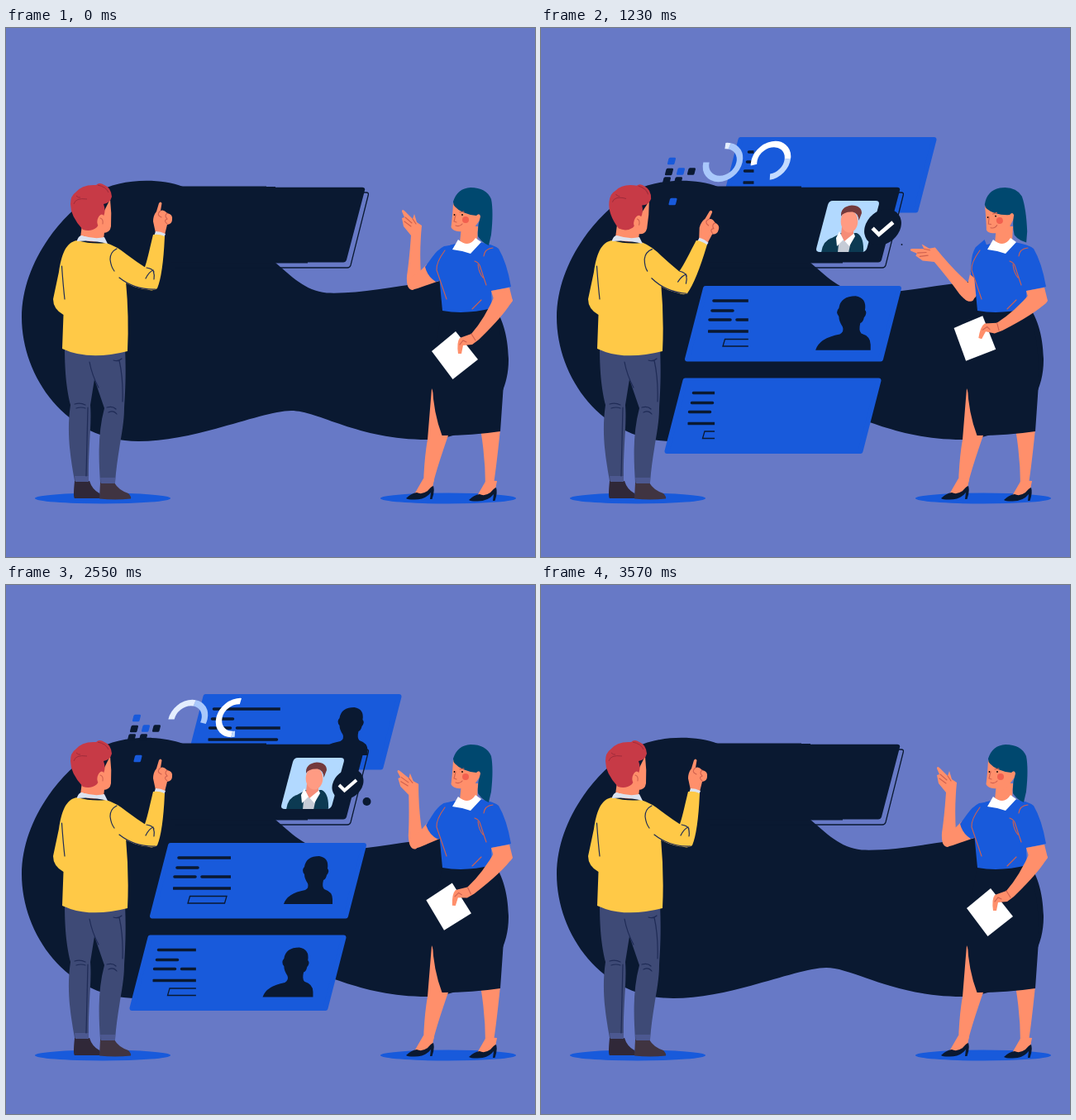
An HTML page that plays this animation: 640 px wide and 640 px high, repeating every 3.66 s.

```html
<!DOCTYPE html>
<html lang="en">
<head>
<meta charset="utf-8">
<title>Profile cards</title>
<style>
  html, body { margin: 0; width: 100%; height: 100%; overflow: hidden; background: #6779c6; }
  svg { display: block; width: 100vw; height: 100vh; }
  .ink { fill: #0a1931; }
  .blue { fill: #185adb; }
  .skin { fill: #ff8f6b; }
  .sun { fill: #ffc947; }
  .jeans { fill: #3e4a76; }
  .teal { fill: #00486f; }
  .red { fill: #c73a46; }
  .white { fill: #fff; }
  .line { fill: none; stroke: #1f2b56; stroke-width: 1.2; stroke-linecap: round; }
  .seam { fill: none; stroke: #cf614f; stroke-width: 1.1; stroke-linecap: round; }
  .card { fill: #185adb; stroke: #185adb; stroke-width: 6; stroke-linejoin: round; }
  .rows { fill: none; stroke: #0a1931; stroke-width: 3.6; stroke-linecap: round; }
  .boxes { fill: none; stroke: #0a1931; stroke-width: 1.3; }
  .tile { stroke-width: 3; stroke-linejoin: round; }
  .arc { fill: none; stroke-width: 7.3; }
</style>
</head>
<body>
<svg viewBox="0 0 640 640">
  <defs>
    <clipPath id="frame"><path d="M355 209H405Q410 209 408.700 214L394.500 266Q393 271 388 271H337Q332 271 333.300 266L347 214Q348.500 209 353 209Z"/></clipPath>
    <g id="foot">
      <path class="skin" d="M505 545L518 546L516 556L507 564L494 564Z"/>
      <path class="ink" d="M484 569Q490 563 497 562Q503 565 510 560Q515 554 517 554Q519 560 515.500 570H513L514 562Q507 571 493 570.500Q486 570.500 484 569Z"/>
    </g>
  </defs>

  <path class="ink" d="M214 192C185 181 136 182 108 200C60 230 19 290 19 350C19 422 73 500 160 500C230 500 310 463 345 463C378 463 425 498 510 498C560 498 609 460 608 400C607 340 575 303 525 306C470 312 430 322 388 320.500C362 318 345 300 326 284V192Z"/>
  <ellipse class="blue" cx="117" cy="569" rx="82" ry="6.500"/>
  <ellipse class="blue" cx="535" cy="569" rx="82" ry="6.500"/>

  <g id="cards"></g>
  <path class="ink" d="M200 191.500H315V192.800H431Q435 193 434 196.500L412 280.500Q411 283.500 408 283.500H365V284.500H248V283.500H200Z"/>
  <path fill="none" stroke="#0a1931" stroke-width="1.300" d="M433 199H436Q439 199 438.300 202L417 287Q416 290 413 290H205"/>

  <g id="photo">
    <g clip-path="url(#frame)">
      <path fill="#b2d9ff" d="M330 205H412V275H330Z"/>
      <path fill="#0c3a52" d="M339 272Q341 257 352 254L363 248H382Q391 252 390 272Z"/>
      <path fill="#c6ccd6" d="M359 272L361 250L377 249L372 272Z"/>
      <path class="white" d="M361 246L366 256L358 264L357 254ZM378 247L366 256L373 264L380 252Z"/>
      <path fill="#f58d78" d="M364 240H378V249L367 258L363 250Z"/>
      <ellipse fill="#ff9b83" cx="373" cy="234" rx="10.300" ry="13.500"/>
      <path fill="#743a3c" d="M363 228Q362 216 376 214.500Q388 215 388 224L384.500 233Q384 224 377 222.500Q366 222 363 228Z"/>
    </g>
  </g>
  <g id="badge">
    <circle class="ink" r="18.500" transform="translate(413.500 241) skewX(-13)"/>
    <path fill="none" stroke="#fff" stroke-width="4" d="M403 242L409.500 248.500L424 236"/>
  </g>
  <circle id="dot" class="ink" r="5" cx="436.500" cy="262"/>
  <g id="tiles"></g>
  <g id="rings"></g>

  <!-- man -->
  <path fill="#302838" d="M83 548H101Q104 558 113 563Q115 567 113 569H83Q81 568 83 548Z"/>
  <path fill="#403441" d="M114 550H131Q136 559 148 563Q152 567 151 569.500Q132 571.500 113 569.500Z"/>
  <path class="jeans" d="M71 386C71 420 74 440 78 456C73 490 78 520 83 548H100C99 510 104 480 102 456L107 425L119 460C111 490 112 520 114 550H132C135 510 143 485 143 460C145 430 145 410 144 386Z"/>
  <path fill="#4c5890" d="M83 542H100V549H84ZM114 544H132V551H115Z"/>
  <path class="line" d="M101 404Q104 420 112 435M137 402Q142 425 141 452M130 402Q136 404 140 400M83 455Q90 453 96 456M85 460Q91 458 96 460M122 459Q129 457 133 461M124 465Q130 462 134 467M99 459Q98 500 97 542"/>
  <path class="skin" d="M92 238H120L118 256Q104 262 90 254Z"/>
  <path class="sun" d="M86 257C72 259 67 275 64 295L57 328Q57 340 69.500 347L68 388Q100 403 147 391Q149 350 145 306L136 275Q130 264 121 260Q104 262 86 257Z"/>
  <path class="line" d="M67.500 288Q69 310 71 328"/>
  <g id="manArm">
    <g id="manFore">
      <path class="skin" d="M181 248L178 234Q178 227 182 222L185 212Q187 209 188.500 212L187 221Q191 219 195 224Q202 225 201 232Q201 237 195 238L192 250Z"/>
      <path class="seam" d="M187 221Q181 226 188 229M195 224Q191 227 195 231Q190 233 195 237"/>
      <path fill="#dce3f0" d="M179 252L181 246Q187 246 193 249L191 254Z"/>
      <path class="sun" d="M178 250C174 266 171 282 167 292L164 312Q175 321 183 315Q190 298 192 252Q185 249 178 250Z"/>
    </g>
    <path class="sun" d="M121 260Q134 264 146 274Q158 283 169 290L179 300L182 316Q158 319 137 303L124 290Z"/>
    <path class="line" d="M134 267Q126 271 126 280Q127 289 131 294M137 302Q156 317 181 316M170 290Q177 291 179 295M169 303Q173 295 178 293Q180 299 179 304"/>
  </g>
  <path fill="#dce3f0" d="M86 257Q88 251 92 251Q107 256 119 253L123 261Q105 256 86 258Z"/>
  <g id="manHead">
    <path class="skin" d="M92 235H112L126 207Q128 224 127 240Q126 248 117 248L114 252H94Z"/>
    <path class="red" d="M84 199Q92 189 109 190Q113 186 119 190Q127 193 128 204Q126 212 118 213Q121 221 118 228L110 241Q103 247 93 244Q78 228 78 213Q78 203 84 199Z"/>
    <ellipse class="skin" cx="115" cy="233" rx="4.500" ry="7.500" transform="rotate(12 115 233)"/>
    <path fill="none" stroke="#9f2c3b" d="M82 213Q84 205 98 207M85 203Q88 206 90 205M111 190Q121 192 124 199"/>
    <path class="seam" d="M114 230Q118 231 117 237"/>
  </g>

  <!-- woman -->
  <path class="skin" d="M515 436L536 490Q522 530 517 550L505 552Q506 520 510 498ZM574 485H598Q594 525 590 552L580 554Q580 520 574 485Z"/>
  <use href="#foot"/>
  <use href="#foot" x="76" y="2"/>
  <path class="ink" d="M528 340L516 400V434Q517 465 527.500 493Q565 493 598 488L601 445Q606 390 590 338Z"/>
  <g id="womanArm">
    <g id="womanFore">
      <path class="skin" d="M490 251Q488 280 485 300Q484 317 492 317Q499 315 502 298Q500 270 503 239L497 235L494 225L492 231L483 222Q479 218 479 222L482 229L479 230L481 240Z"/>
      <path class="seam" d="M483 229L491 236M482 234L490 240M492 231L496 237"/>
    </g>
    <path class="skin" d="M509 286L498 297Q486 300 486 311Q488 318 498 315L524 306Z"/>
    <path class="blue" d="M530 264Q522 268 515 278L507 289Q510 301 520 307L536 303L544 262Z"/>
  </g>
  <path class="blue" d="M544 261Q532 263 528 269Q523 282 524 300L528 342Q556 347 588 339L587 318L611 313Q606 284 596 267Q590 262 573 259Z"/>
  <path class="seam" d="M531 269Q520 284 521 293L533 328M589 266Q579 267 578 276M567 282Q573 284 574 290L581 311M571 286Q572 296 577 302M564 340L575 329"/>
  <path class="skin" d="M551 240H571L570 259Q560 270 549 260Z"/>
  <path class="white" d="M547 256L540 268L552 270L562 273L575 259L568 254Q560 267 547 256Z"/>
  <g id="womanHead">
    <path class="skin" d="M541 212Q540 230 538.500 241Q541 247 552 246L551 250Q563 250 569 238L575 230L570 210Z"/>
    <path class="teal" d="M541 210Q546 194 562 193Q581 193 587 207Q590 222 587 250L584 263Q576 260 571 252Q570 240 574 228Q573 223 569 227Q551 225 543 216Q541 214 541 210Z"/>
    <circle fill="#f2604f" cx="556" cy="232" r="4"/>
    <circle cx="542.500" cy="226" r=".9"/><circle cx="552" cy="226" r=".9"/>
    <path class="seam" d="M544 226L542 234L545 235M544 239Q549 241 552 237M549 223L554 222"/>
  </g>
  <path class="skin" d="M587 318L609 314L613 330Q610 336 600 338L590 328Z"/>
  <g id="paperArm">
    <path class="white" d="M544 367L571 401L540.500 425L515 391Z"/>
    <path class="skin" d="M593 320Q603 316 613 329Q604 346 572 377L564 383L553 384L551 394H547Q545 380 549 375L563 370Q579 352 593 320Z"/>
    <path class="seam" d="M563 370L568 378M549 383L553 378L557 380"/>
  </g>
</svg>
<script>
const LOOP = 3660;
const $ = id => document.getElementById(id);
const add = (parent, markup) => {
  parent.insertAdjacentHTML('beforeend', markup);
  return parent.lastElementChild;
};

const unit = (t, from, to) => Math.min(1, Math.max(0, (t - from) / (to - from)));
const ease = u => u < .5 ? 2 * u * u : 1 - 2 * (1 - u) ** 2;
const glide = u => 1.5 * u - .5 * u * u;

// Rises to 1 and falls back to 0.
const swing = (t, a, b, c, d) => ease(unit(t, a, b)) - ease(unit(t, c, d));

// Grows past full size, then settles; leaves the same way.
const bump = u => u < .5 ? 1.22 * ease(2 * u) : 1.22 - .22 * ease(2 * u - 1);
const pop = (t, start, end) => t < end ? bump(unit(t, start, start + 300)) : bump(1 - unit(t, end, end + 300));

const turn = (id, deg, x, y) => $(id).setAttribute('transform', `rotate(${deg} ${x} ${y})`);
const scale = (el, s, x, y) =>
  el.setAttribute('transform', `translate(${x} ${y}) scale(${s}) translate(${-x} ${-y})`);

const PERSON = 'M336 386Q340 373 362 369Q367 366 365 361Q361 355 361 350Q357 345 361 341Q363 328 379 328Q391 330 389 343Q392 346 388 351Q387 356 384 357Q382 365 385 368Q395 371 395 380V386Z';

const cards = [
  { x: 42.5, y: -180, dx: -24, dy: 80, move: [655, 985, 3300, 3570], text: [1143, 2343], face: [1410, 2810] },
  { x: -24.500, y: 111.5, dx: 24, dy: -80, move: [550, 880, 3062, 3392], text: [1010, 2106], face: [1260, 2510] },
  { x: 0, y: 0, dx: 26, dy: -80, move: [435, 765, 3190, 3520], text: [900, 2225], face: [1110, 2660] }
];
cards.forEach((c, i) => {
  c.el = add($('cards'), `<g>
    <clipPath id="wipe${i}"><rect x="202" y="325" height="65"/></clipPath>
    <path class="card" d="M199 315H433L411 400.500H177Z"/>
    <g clip-path="url(#wipe${i})">
      <path class="rows" d="M209 330H291M207 342H232M204 353H229M237 353H306M203 367H285"/>
      <path class="boxes" d="M222.500 376.500H267L264.500 385H220ZM276.500 376.500H317L314.500 385H274Z"/>
    </g>
    <path class="ink" d="${PERSON}"/></g>`);
  c.wipe = c.el.querySelector('rect');
  c.person = c.el.lastElementChild;
});

const tiles = [[158, 161, 1], [155, 174, 0], [169, 173.5, 1], [182, 173.5, 0], [152, 184.5, 0], [166, 184.5, 0], [159.5, 210, 1]];
for (const [x, y, blue] of tiles) {
  const color = blue ? '#185adb' : '#0a1931';
  add($('tiles'), `<path class="tile" fill="${color}" stroke="${color}" transform="translate(${x} ${y}) skewX(-14)" d="M-2.800-2.800h5.600v5.600h-5.600z"/>`);
}

const arcs = [];
function ring(x, y, spin, parts) {
  for (const [from, to, color] of parts) {
    const el = add($('rings'), `<path class="arc" pathLength="100" stroke="${color}"
      transform="translate(${x} ${y}) skewX(-13) rotate(${spin})" d="M-20 0A20 20 0 0 0 20 0A20 20 0 0 0-20 0"/>`);
    arcs.push({ el, from, to });
  }
}
ring(220, 162.5, 0, [[0, 72, '#a9c8fb'], [72, 100, '#e4eefe']]);
ring(278, 160.5, -100, [[0, 24, '#c3dbff'], [24, 97, '#fff'], [97, 100, '#c3dbff']]);

function draw(t) {
  for (const c of cards) {
    const p = swing(t, ...c.move);
    c.el.setAttribute('transform', `translate(${c.x + c.dx * (1 - p)} ${c.y + c.dy * (1 - p)})`);
    c.el.setAttribute('opacity', p);
    const [show, hide] = c.text;
    c.wipe.setAttribute('width', 118 * (unit(t, show, show + 800) - unit(t, hide, hide + 800)));
    scale(c.person, pop(t, ...c.face), 366, 357);
  }

  const tail = 100 * glide(unit(t, 2130, 3340));
  const head = 100 * glide(unit(t, 450, 1650));
  for (const { el, from, to } of arcs) {
    const a = Math.max(from, tail), b = Math.min(to, head);
    el.setAttribute('visibility', b > a ? 'visible' : 'hidden');
    el.setAttribute('stroke-dasharray', `0 ${a} ${Math.max(0, b - a)} 200`);
  }

  scale($('tiles'), pop(t, 780, 3025), 168, 177);
  scale($('photo'), pop(t, 705, 3080), 371, 240);
  scale($('badge'), pop(t, 1100, 2860), 413.5, 241);
  scale($('dot'), pop(t, 1190, 2920), 436.5, 262);

  const point = swing(t, 180, 600, 1080, 1500);
  turn('manHead', 8.5 * point, 106, 252);
  turn('manArm', 8 * point, 128, 272);
  turn('manFore', 11 * point, 176, 306);

  const reach = swing(t, 290, 1090, 2000, 2730);
  turn('womanArm', -32 * reach, 530, 272);
  turn('womanFore', -12 * reach, 492, 308);
  turn('womanHead', -9 * swing(t, 400, 1400, 1900, 2560), 562, 240);
  turn('paperArm', 17.5 * swing(t, 450, 1350, 2100, 2880), 602, 325);
}

function tick() {
  draw(performance.now() % LOOP);
  requestAnimationFrame(tick);
}
tick();
</script>
</body>
</html>
```
